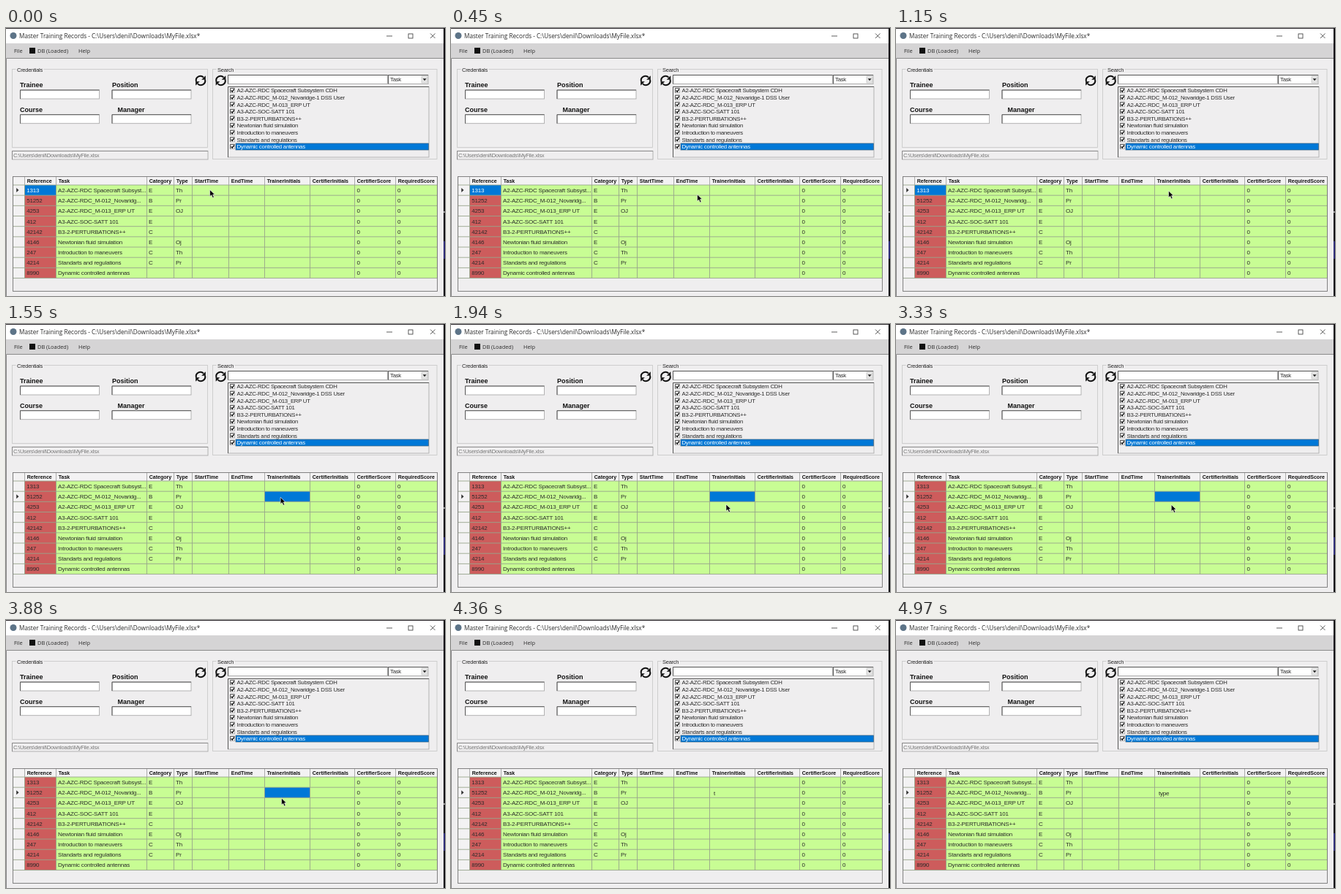
Animation, 600 px wide and 367 px high, one loop 5000 ms. Source, as an HTML page:

```html
<!DOCTYPE html>
<html lang="en">
<head>
<meta charset="utf-8">
<title>Master Training Records</title>
<style>
html, body { margin: 0; width: 100%; height: 100%; overflow: hidden; background: #efeeef; }
svg { display: block; width: 600px; height: 367px; }
text { font: 8px "Liberation Sans", Arial, sans-serif; fill: #2a2a2a; white-space: pre; letter-spacing: -.19px; }
.list { letter-spacing: -.27px; }
.ui { font-family: "Open Sans", "Noto Sans", sans-serif; letter-spacing: 0; }
.bold { font-weight: bold; fill: #111; letter-spacing: 0; }
</style>
</head>
<body>
<svg id="stage" viewBox="0 0 600 367"></svg>
<script>
const stage = document.getElementById('stage');
const FORM = '#efeeef', BLUE = '#0078d7', GREEN = '#c8fd94', RED = '#cd5c5c', GRID = '#98a58c';

function add(tag, attrs) {
  const el = document.createElementNS('http://www.w3.org/2000/svg', tag);
  for (const key in attrs) el.setAttribute(key, attrs[key]);
  return stage.appendChild(el);
}
const box = (x, y, width, height, fill, stroke = 'none', sw = 1) =>
  add('rect', { x, y, width, height, fill, stroke, 'stroke-width': sw });
const path = (d, stroke, sw = 1, fill = 'none') =>
  add('path', { d, stroke, 'stroke-width': sw, fill });
function label(x, y, str, size = 8, cls = '', fill = '') {
  const el = add('text', { x, y, class: cls, style: `font-size:${size}px;${fill && 'fill:' + fill}` });
  el.textContent = str;
  return el;
}
// Inset border: dark top and left, lighter bottom and right
function sunken(x, y, w, h, fill, dark = '#555') {
  box(x, y, w, h, fill, '#aaa', .9);
  path(`M${x} ${y + h}v${-h}h${w}`, dark);
}

// Window frame and title bar
box(0, 0, 600, 367, FORM);
box(0, 0, 598, 21, '#fff');
box(0, 0, 600, 1, '#282428');
box(598, 0, 2, 367, '#151318');
box(598, 292, 2, 24, '#2e2c78');
box(598, 251, 2, 2, '#999');
add('circle', { cx: 10, cy: 10.5, r: 4.5, fill: '#5d7488' });
label(18, 13.8, 'Master Training Records - C:\\Users\\denil\\Downloads\\MyFile.xlsx*', 8.2, 'ui');
path('M520 11h8M580 7.5l6.5 6.5m0-6.5l-6.5 6.5', '#333', .8);
box(550, 8, 6, 6, 'none', '#333', .8);

// Menu
box(0, 21, 598, 20, '#d5d4d5');
path('M598 41.5H.5V367', '#8a8a8a');
label(11, 33.6, 'File', 7.4, 'ui');
box(32, 27, 8, 8, '#111');
label(43, 33.6, 'DB (Loaded)', 7.4, 'ui');
label(99, 33.6, 'Help', 7.4, 'ui');

// Group boxes
function group(x, y, w, h, title, titleWidth) {
  box(x, y, w, h, 'none', '#cacaca', .9);
  box(x + 5, y - 2, titleWidth, 4, FORM);
  label(x + 6.5, y + 3, title, 7.5, 'list');
}
group(8.5, 56.5, 267, 107, 'Credentials', 38);
group(282.5, 56.5, 306.5, 123, 'Search', 25);

function field(title, titleX, x, y) {
  label(titleX, y - 4, title, 9, 'bold');
  sunken(x, y, 108, 12, '#fff');
}
field('Trainee', 19, 19.5, 85);
field('Position', 145, 145, 85);
field('Course', 19, 19.5, 118.7);
field('Manager', 152.5, 145, 118.7);

function refresh(x, y) {
  const half = 'M-6 1.5A6 6 0 0 1 4 -4.4';
  const head = 'M6.8 -6.8V-1.2H1.2Z';
  for (const turn of [0, 180]) {
    const transform = `translate(${x} ${y}) rotate(${turn})`;
    path(half, '#111', 2).setAttribute('transform', transform);
    path(head, 'none', 0, '#111').setAttribute('transform', transform);
  }
}
refresh(266, 72);
refresh(293.5, 72);

sunken(8.5, 168.5, 267.5, 11.5, FORM, '#888');
label(10, 177, 'C:\\Users\\denil\\Downloads\\MyFile.xlsx', 7.6, 'list', '#777');

// Search area
sunken(303.5, 64.5, 218, 12, '#fff');
sunken(522.5, 64.5, 54.5, 12, '#fff');
label(525, 73.4, 'Task', 7.8, 'list');
box(568, 66, 8, 9, '#e6e6e6', '#aaa', .5);
path('M569.6 69.2h5l-2.5 3z', 'none', 0, '#222');
sunken(303.5, 80.5, 274.5, 96.5, FORM);

const tasks = ['A2-AZC-RDC Spacecraft Subsystem CDH', 'A2-AZC-RDC_M-012_Novaridge-1 DSS User',
  'A2-AZC-RDC_M-013_ERP UT', 'A3-AZC-SOC-SATT 101', 'B3-2-PERTURBATIONS++',
  'Newtonian fluid simulation', 'Introduction to maneuvers', 'Standarts and regulations',
  'Dynamic controlled antennas'];
tasks.forEach((task, i) => {
  const y = 85.6 + i * 9.6, last = i === 8;
  if (last) box(314, y - 4.4, 263.5, 9, BLUE, '#3a5f7a', .7);
  sunken(306.5, y - 3, 6, 6, '#fff');
  path(`M307.6 ${y}l1.6 1.7 2.6-3.6`, '#111', 1.4);
  label(315.5, y + 2.7, task, 7.8, 'list', last ? '#fff' : '');
});

// Records table
const cols = [9.5, 25.5, 68.5, 192.5, 229.5, 254.5, 304.5, 353.5, 415.5, 476.5, 532.5, 589.5];
const HEAD = 203.5, TOP = 215, PITCH = 14.17, RIGHT = 589.5;
const rowY = i => TOP + i * PITCH;
const heads = ['Reference', 'Task', 'Category', 'Type', 'StartTime', 'EndTime', 'TrainerInitials',
  'CertifierInitials', 'CertifierScore', 'RequiredScore'];
const refs = [1313, 51252, 4253, 412, 42142, 4146, 247, 4214, 8990];
const categories = ['E', 'B', 'E', 'E', 'C', 'E', 'C', 'C', ''];
const types = ['Th', 'Pr', 'OJ', '', '', 'Oj', 'Th', 'Pr', ''];
const bottom = rowY(9);

box(9.5, HEAD, 580, bottom - HEAD, '#f3f2f3');
box(68.5, TOP, 521, bottom - TOP, GREEN);
box(25.5, TOP, 43, bottom - TOP, RED);
const refCell = box(25.5, TOP, 43, PITCH, BLUE);
const editCell = box(353.5, rowY(1), 62, PITCH, BLUE);
for (let i = 0; i <= 9; i++) path(`M9.5 ${rowY(i)}H${RIGHT}`, GRID, .9);
cols.forEach(x => {
  path(`M${x} ${HEAD}V${TOP}`, '#a5a5a5', .9);
  path(`M${x} ${TOP}V${bottom}`, GRID, .9);
});
box(9.5, HEAD, 580, 157, 'none', '#777', .9);
heads.forEach((head, i) => label(cols[i + 1] + 3.2, 212.2, head, 7.05, 'bold'));

const short = s => s.length > 31 ? s.slice(0, s.includes('_') ? 25 : 29) + '...' : s;
let firstRef;
tasks.forEach((task, i) => {
  const y = rowY(i) + 10;
  const ref = label(28.2, y, refs[i]);
  firstRef ??= ref;
  label(71, y, short(task));
  label(195, y, categories[i]);
  label(232, y, types[i]);
  label(479.5, y, '0');
  label(535, y, '0');
});

const marker = path('M14.2 -3l3.3 3-3.3 3z', 'none', 0, '#333');
const typed = label(359, rowY(1) + 11.2, '');
const pointer = path('M0 0V9.2L2.2 7.2 3.9 11 5.6 10.2 4 6.6H6.8Z', '#fff', .6, '#000');

// Pointer stops: time, x, y
const stops = [[0, 278.5, 221.5], [450, 336.5, 228], [1150, 372.5, 223], [1500, 375, 236],
  [1940, 376, 247], [2760, 376, 251], [3880, 376.5, 244], [5000, 376.5, 244]];
const CLICK = 1520, TYPE = 4300, KEY = 150;

function draw(t) {
  const k = stops.findIndex(s => s[0] > t);
  const [a, b] = [stops[k - 1], stops[k]];
  const p = (t - a[0]) / (b[0] - a[0]);
  const at = n => a[n] + (b[n] - a[n]) * p;
  const clicked = t >= CLICK, typing = t >= TYPE;
  const show = (el, on) => el.setAttribute('visibility', on ? 'visible' : 'hidden');

  pointer.setAttribute('transform', `translate(${at(1)} ${at(2)})`);
  show(pointer, !typing);
  show(refCell, !clicked);
  show(editCell, clicked && !typing);
  firstRef.style.fill = clicked ? '' : '#fff';
  marker.setAttribute('transform', `translate(0 ${rowY(clicked ? 1 : 0) + PITCH / 2})`);
  typed.textContent = typing ? 'type'.slice(0, 1 + Math.floor((t - TYPE) / KEY)) : '';
}

const start = performance.now();
function frame() {
  draw((performance.now() - start) % 5000);
  requestAnimationFrame(frame);
}
frame();
</script>
</body>
</html>
```
